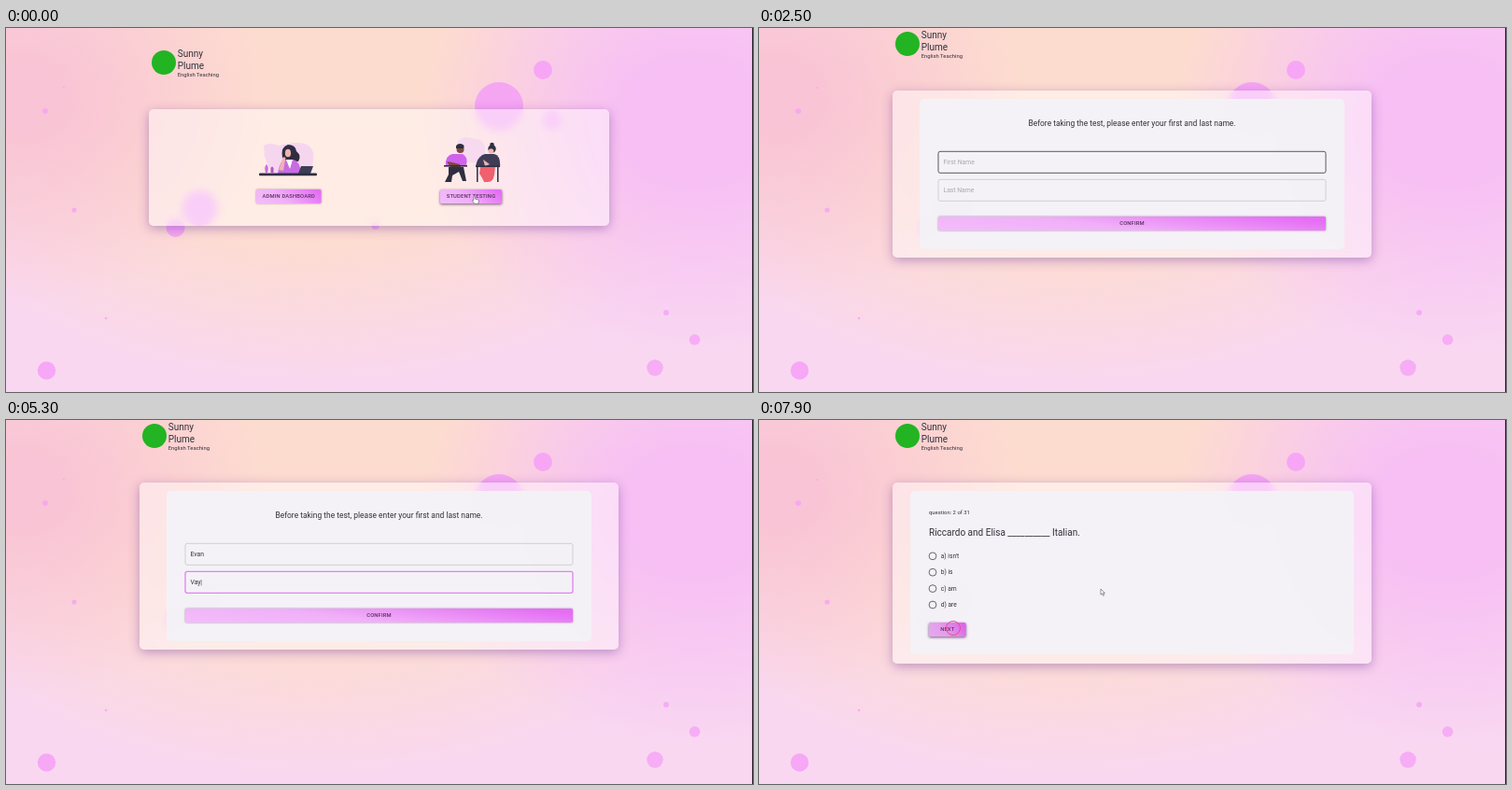
Recreate the animation shown at these times as an HTML page. Size 800x390 px, loop 8000 ms.

```html
<!DOCTYPE html>
<html lang="en">
<head>
<meta charset="utf-8">
<title>Placement test</title>
<style>
html, body { margin: 0; width: 100%; height: 100%; overflow: hidden; }
body {
  position: relative;
  background:
    radial-gradient(290px 250px at 735px 100px, #f7bff4 25%, #f7bff400),
    radial-gradient(260px 220px at 20px 75px, #f9c4d5 15%, #f9c4d500),
    radial-gradient(470px 300px at 330px 90px, #fddcd0 45%, #fddcd000),
    #f9d7f1;
}
svg { position: absolute; left: 0; top: 0; width: 800px; height: 390px; }
#panel {
  position: absolute; border-radius: 5px;
  background: rgba(255, 255, 255, .45);
  backdrop-filter: blur(4px);
  box-shadow: 0 3px 12px rgba(105, 50, 150, .42);
}
text { font-family: Roboto, Arial, sans-serif; fill: #33303a; }
.btn { fill: url(#pink); filter: drop-shadow(0 .8px .8px rgba(60, 20, 70, .45)); }
.btn.hot { filter: drop-shadow(0 1.3px 1.6px rgba(60, 20, 70, .7)); }
.label { font-size: 5.8px; font-weight: 500; letter-spacing: .0286em; text-anchor: middle; fill: #57305f; }
</style>
</head>
<body>
<svg id="bubbles" fill="#f5a3f6"></svg>
<div id="panel"></div>
<svg>
  <defs>
    <linearGradient id="pink" x1="0" y1=".65" x2="1" y2=".35">
      <stop offset="0" stop-color="#f3bafa"/>
      <stop offset=".38" stop-color="#f0b0f8"/>
      <stop offset="1" stop-color="#e56df5"/>
    </linearGradient>
  </defs>
  <g id="stage"></g>
  <rect x="799" width="1" height="390" fill="#2b2530"/>
</svg>
<script>
const $ = id => document.getElementById(id);
const LOOP = 8000, STEP = 100;

const bubbles = [
  [575, 45, 10], [528, 84, 26], [585, 99, 10], [42, 89, 3], [62, 64, 1],
  [73, 195, 2.6], [207.5, 193, 19], [181.5, 214, 10], [395.5, 212, 4],
  [107, 311, 1.3], [43.5, 367, 9.7], [707, 305, 3], [737.5, 334, 5.8], [695, 364, 8.7]
];
$('bubbles').innerHTML = bubbles.map(([x, y, r]) =>
  `<circle cx="${x}" cy="${y}" r="${r}" opacity="${r < 9 ? .8 : .92}"/>`).join('');

const text = (x, y, size, str, attrs = '') =>
  `<text x="${x}" y="${y}" font-size="${size}" ${attrs}>${str}</text>`;
const rect = (x, y, w, h, attrs) =>
  `<rect x="${x}" y="${y}" width="${w}" height="${h}" ${attrs}/>`;
const path = (d, fill) => `<path d="${d}" fill="${fill}"/>`;
const dot = (x, y, r, fill) => `<circle cx="${x}" cy="${y}" r="${r}" fill="${fill}"/>`;
const button = (x, y, w, str, hot) =>
  rect(x, y, w, 15, `rx="1.5" class="btn ${hot ? 'hot' : ''}"`) +
  `<text class="label" x="${x + w / 2}" y="${y + 9.4}">${str}</text>`;
const card = (x, w, h) => rect(x, 76, w, h, 'rx="5" fill="#f4f2f6" fill-opacity=".97"');

const header = (x, y) =>
  dot(x + 14, y + 17, 13, '#22b422') +
  text(x + 28.7, y + 10.5, 10, 'Sunny') +
  text(x + 28.7, y + 23.8, 10, 'Plume') +
  text(x + 28.7, y + 32.3, 5.9, 'English Teaching');

const dark = '#2f2e41', skin = '#eeb3b0', brown = '#7b4a40';
const deskWoman =
  path('M276 126Q283 122 292 126Q308 121 320 124Q331 128 329 142Q328 152 322 156H285Q280 146 277 138Z', '#f6d6ef') +
  path('M296 139Q294 127 302 125Q310 125 311 132Q317 137 313 143L300 142Z', dark) +
  path('M291 156Q293 142 299 141H308Q315 143 316 156Z', '#c86be4') +
  path('M300 141H307L304 151Z', '#fff') +
  `<ellipse cx="302" cy="134" rx="3.1" ry="4.3" fill="${skin}"/>` +
  path('M292 152L297 138L299.5 139L297 153Z', skin) +
  path('M278 155Q276 149 279 146Q282 149 280 155Z', '#d169ea') +
  path('M283.5 155V150Q285 147 286.5 150V155Z', '#b553c9') +
  path('M316 148H329L326 156H313Z', '#3f3d56') +
  rect(271, 155.4, 62, 2.8, `rx="1" fill="${dark}"`);
const students =
  path('M483 122Q490 114 502 119Q514 118 513 134L509 144H490Z', '#f7daf0') +
  dot(486.5, 130, 4, brown) + path('M482 129Q481 124 487 124Q492 125 490 129Z', dark) +
  path('M471 147Q470 137 478 135H489Q495 138 493 147Z', '#d063ee') +
  path('M472 143L476 149H487L486 146L478 144Z', brown) +
  rect(469, 147, 25, 1.6, `fill="${dark}"`) +
  path('M474 149H490L493 164H489L485 154L478 158L477 165H470L474 157Z', dark) +
  dot(520.5, 125, 2.3, dark) + dot(520.5, 129.5, 4.2, dark) + dot(519.5, 132, 2.8, skin) +
  path('M503 148Q505 137 513 135H523Q530 137 529 149Z', '#3f3d56') +
  path('M511 141L518 146L513 148Z', skin) +
  rect(503, 147.5, 26, 1.6, `fill="${dark}"`) +
  path('M508 149H524L523 157Q522 165 516 165H512Q510 160 507 156Z', '#f0606f') +
  path('M504 149H505.5V165H504ZM526 149H527.5V165H526Z', dark);

const home = t => header(155, 20) + deskWoman + students +
  button(268, 173, 69.5, 'ADMIN DASHBOARD') + button(465, 173, 66, 'STUDENT TESTING', true);

const select = t => header(145, 0) +
  text(399.5, 118, 10, 'Please select the placement test you wish to take:', 'text-anchor="middle"') +
  button(330, 135, 41.5, 'BEGINNER', t >= 1300) + button(385, 135, 84.5, 'BEGINNER TO ADVANCED');

// One letter every `gap` ms from `start`.
const typed = (word, t, start, gap) =>
  word.slice(0, Math.max(0, Math.floor((t - start) / gap) + 1));

function field(y, hint, value, state) {
  const [color, width] = { idle: ['#c9c6cc', .8], hover: ['#4a474d', .9], focus: ['#df82f0', 1.3] }[state];
  const caret = state == 'focus' ? '<tspan fill="#333" dx="-.4">|</tspan>' : '';
  return rect(192, y, 415, 23, `rx="2" fill="none" stroke="${color}" stroke-width="${width}"`) +
    (value
      ? text(197.5, y + 14.1, 6.8, value + caret)
      : text(197.5, y + 14.1, 6.8, hint, 'style="fill:#aaa7ad"') +
        (caret && rect(197.3, y + 7.3, .8, 8, 'fill="#444"')));
}

function form(t) {
  const first = t < 2800 ? 'hover' : t < 4500 ? 'focus' : 'idle';
  const last = t >= 4500 ? 'focus' : t >= 3200 && t < 3700 ? 'hover' : 'idle';
  return header(145, 0) + card(172, 455, 161) +
    text(399.5, 105, 8.44, 'Before taking the test, please enter your first and last name.', 'text-anchor="middle"') +
    field(132.3, 'First Name', typed('Evan', t, 3700, 200), first) +
    field(162.3, 'Last Name', typed('Vay', t, 4700, 200), last) +
    button(192, 202, 415, 'CONFIRM');
}

function quiz(number, question, answers, hover, picked) {
  return header(145, 0) + card(162, 475, 175) +
    text(182, 101, 5.9, `question: ${number} of 31`) +
    text(182, 123.6, 10, question) +
    answers.map((a, i) => {
      const y = 145.8 + i * 17.4, on = i == picked;
      return (i == hover ? dot(186, y, 9, 'rgba(0,0,0,.06)') : '') +
        `<circle cx="186" cy="${y}" r="3.9" fill="none" stroke="${on ? '#df6cf0' : '#625f66'}" stroke-width=".95"/>` +
        (on ? dot(186, y, 2, '#df6cf0') : '') +
        text(194.7, y + 2.2, 6.7, 'abcd'[i] + ') ' + a);
    }).join('');
}

const quizOne = t => quiz(1, 'Petko __________ from Bulgaria.', ['are', 'is', "aren't", 'am'],
    t >= 6400 && t < 6700 ? 0 : t >= 6700 && t < 7100 ? 1 : -1, t >= 6900 ? 1 : -1) +
  button(182, 217, 43.5, 'NEXT', t >= 7300);

const quizTwo = t => quiz(2, 'Riccardo and Elisa __________ Italian.', ["isn't", 'is', 'am', 'are']) +
  button(182, 217, 39.5, 'NEXT', true) +
  rect(182, 217, 39.5, 15, 'rx="1.5" fill="#a040b0" fill-opacity=".16"') +
  '<circle cx="208" cy="223" r="7.5" fill="none" stroke="#ec4a86" stroke-width="1"/>';

// Start time, panel x, y, width, height, contents.
const pages = [
  [0, 153, 86.5, 493, 125, home],
  [500, 143, 66.7, 513, 125, select],
  [1800, 143, 66.7, 513, 179, form],
  [5400, 143, 66.7, 513, 194, quizOne],
  [7600, 143, 66.7, 513, 194, quizTwo]
];

// Time and position of the pointer tip.
const track = [
  [0, 501, 180], [600, 501, 180], [1300, 357, 139], [2800, 357, 143], [3200, 362, 173],
  [5700, 362, 173], [6400, 188, 145], [6600, 188, 145], [6800, 187, 162], [6900, 187, 162],
  [7300, 208, 222], [7600, 208, 222], [7800, 366, 181], [8000, 366, 181]
];

function pointer(t) {
  const i = track.findIndex(k => k[0] > t);
  const [t0, x0, y0] = track[i - 1], [t1, x1, y1] = track[i];
  const p = (t - t0) / (t1 - t0), e = p * p * (3 - 2 * p);
  const x = x0 + (x1 - x0) * e, y = y0 + (y1 - y0) * e;
  if (t >= 1800 && t < 5400)
    return t >= 2800 && t < 3700 ? rect(x, y - 1.5, 1.8, 1.8, 'fill="#6b6870"') : '';
  const hand = t < 600 || t >= 1300 && t < 1800 || t >= 6400 && t < 7600;
  const shape = hand
    ? 'M0 .7Q.8-.5 1.6.7V3.2L4.8 4Q5.6 4.4 5.3 6L4.6 8.5H1L-1.7 5.2Q-1.6 4-.2 4.8Z'
    : 'M0 0V6.2L1.5 4.9L2.6 7.3L3.6 6.8L2.5 4.5H4.4Z';
  return `<path transform="translate(${x} ${y})" d="${shape}" fill="#fff" stroke="#55505a" stroke-width=".6"/>`;
}

let shown = -1;
function frame(now) {
  const t = Math.floor(now % LOOP / STEP) * STEP;
  if (t != shown) {
    shown = t;
    const [, x, y, w, h, draw] = pages.findLast(p => p[0] <= t);
    Object.assign($('panel').style, { left: x + 'px', top: y + 'px', width: w + 'px', height: h + 'px' });
    $('stage').innerHTML = draw(t) + pointer(t);
  }
  requestAnimationFrame(frame);
}
const start = performance.now();
const tick = () => frame(Math.max(0, performance.now() - start));
frame = (draw => now => draw(Math.max(0, performance.now() - start)))(frame);
tick();
</script>
</body>
</html>
```
